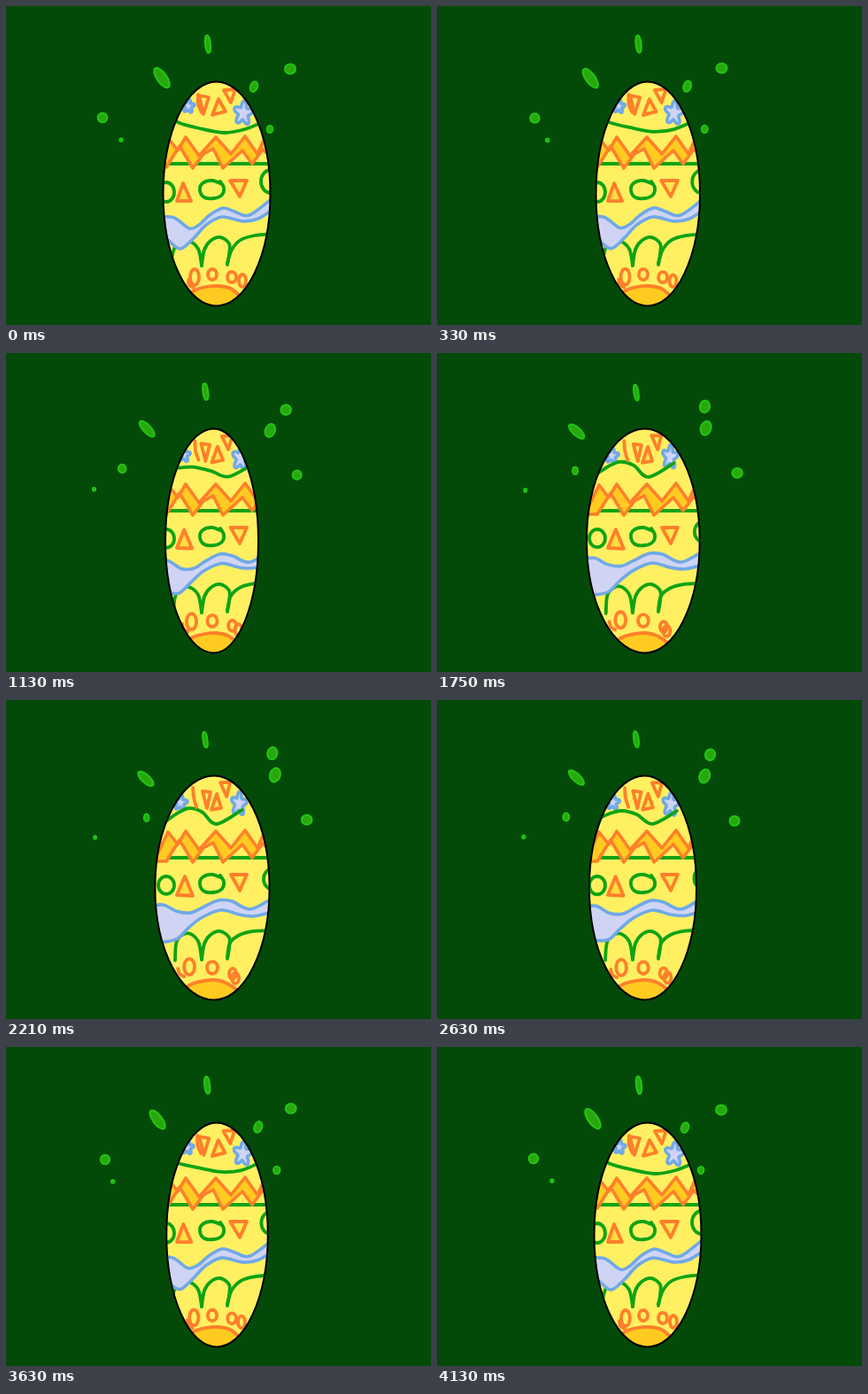
Recreate the animation shown at these times as an HTML page. Size 480 by 360 pixels, loop 4180 ms.

```html
<!DOCTYPE html>
<html lang="en">
<head>
<meta charset="utf-8">
<title>Easter egg</title>
<style>
  html, body { margin: 0; width: 100%; height: 100%; overflow: hidden; background: #034a08; }
  svg { display: block; width: 100%; height: 100%; }
  path, ellipse { stroke-linecap: round; stroke-linejoin: round; }
</style>
</head>
<body>
<svg id="stage" viewBox="0 0 480 360">
  <defs><clipPath id="shell"><path id="shellClip"/></clipPath></defs>
  <rect width="480" height="360" fill="#034a08"/>
  <g id="sparks"></g>
  <path id="base" fill="#fff062"/>
  <g id="decor" clip-path="url(#shell)"></g>
  <path id="outline" fill="none" stroke="#000" stroke-width="2"/>
</svg>
<script>
const LOOP = 4180, FRAME = 41.75, SWING = 98;
const ORANGE = '#ff7f2a', AMBER = '#ffcb20', GREEN = '#0fa313', BLUE = '#70a9e6', LILAC = '#d0d4f4';
const $ = id => document.getElementById(id);

function add(parent, tag, attrs) {
  const el = document.createElementNS('http://www.w3.org/2000/svg', tag);
  set(el, attrs);
  return parent.appendChild(el);
}
function set(el, attrs) {
  for (const key in attrs) el.setAttribute(key, attrs[key]);
}

const mix = (a, b, k) => a + (b - a) * k;
// Parabola through a, m and b at k = 0, 0.5 and 1.
const bend = ([a, m, b], k) => a + k * (4 * m - 3 * a - b) + k * k * 2 * (a - 2 * m + b);
// Piecewise linear track of [position, value] pairs.
function track(keys, k) {
  let i = 1;
  while (i < keys.length - 1 && k > keys[i][0]) i++;
  const [k0, v0] = keys[i - 1], [k1, v1] = keys[i];
  return mix(v0, v1, (k - k0) / (k1 - k0));
}

const points = text => text.split(' ').map(p => p.split(',').map(Number));
const morph = (a, b, k) => a.map((p, i) => p.map((v, j) => mix(v, b[i][j], k)));
const straight = pts => 'M' + pts.join('L');
// Catmull-Rom spline as cubic segments.
function smooth(pts) {
  let d = 'M' + pts[0];
  for (let i = 0; i < pts.length - 1; i++) {
    const a = pts[i - 1] || pts[i], b = pts[i], c = pts[i + 1], e = pts[i + 2] || c;
    d += 'C' + [b[0] + (c[0] - a[0]) / 6, b[1] + (c[1] - a[1]) / 6,
                c[0] - (e[0] - b[0]) / 6, c[1] - (e[1] - b[1]) / 6, c[0], c[1]].map(v => v.toFixed(2));
  }
  return d;
}

const updates = [];
function shape(stroke, fill, from, to = from, draw = smooth, close = '') {
  const a = points(from), b = points(to);
  const el = add($('decor'), 'path', { stroke, fill, 'stroke-width': 3.8 });
  updates.push(k => set(el, { d: draw(morph(a, b, k)) + close }));
}
const line = (stroke, from, to) => shape(stroke, 'none', from, to);
const triangle = (fill, from, to) => shape(ORANGE, fill, from, to, straight, 'Z');

function ring(stroke, fill, from, to = from) {
  const el = add($('decor'), 'ellipse', { stroke, fill, 'stroke-width': 3.8 });
  updates.push(k => {
    const [cx, cy, rx, ry] = from.map((v, i) => mix(v, to[i], k));
    set(el, { cx, cy, rx, ry });
  });
}

// A filled ribbon with both edges stroked.
function ribbon(stroke, fill, top0, low0, top1, low1, draw) {
  const tops = [top0, top1].map(points), lows = [low0, low1].map(points);
  const area = add($('decor'), 'path', { fill });
  const edges = add($('decor'), 'path', { stroke, fill: 'none', 'stroke-width': 3.6 });
  updates.push(k => {
    const top = draw(morph(...tops, k)), low = morph(...lows, k);
    set(edges, { d: top + draw(low) });
    set(area, { d: top + draw(low.reverse()).replace('M', 'L') + 'Z' });
  });
}

function flower(from, to) {
  const el = add($('decor'), 'path', { stroke: BLUE, fill: LILAC, 'stroke-width': 3.6 });
  updates.push(k => {
    const [x, y, w, h] = from.map((v, i) => mix(v, to[i], k));
    const pts = [];
    for (let i = 0; i <= 40; i++) {
      const a = i / 40 * 2 * Math.PI, r = 0.76 + 0.24 * Math.cos(5 * a + 1);
      pts.push([x + w * r * Math.cos(a), y + h * r * Math.sin(a)]);
    }
    set(el, { d: smooth(pts) });
  });
}

flower([206, 113, 7, 8], [197, 116, 8, 9]);
flower([268, 121, 11, 14], [263, 117, 9, 14]);
line(GREEN, '184,125 196,132 218,138 246,143 270,139 292,130', '182,136 193,128 206,122 221,126 237,140 266,124');
line(ORANGE, '217,100 217,111 221,120', '211,99 212,110 215,121');
triangle('none', '218,101 229,103 223,122', '222,103 231,104 227,122');
triangle('#ffe650', '240,105 233,123 248,119', '238,106 232,124 243,122');
triangle('none', '246,95 259,94 254,109', '242,93 253,93 249,109');

line(GREEN, '160,178 310,178');
const zigTop = '169,178 183,149 194,163 203,148 218,169 237,148 254,167 270,147 284,167 293,147 304,166';
const zigLow = '169,182 181,182 196,158 211,183 223,167 234,161 245,183 267,163 278,178 290,162 304,174';
ribbon(ORANGE, AMBER, zigTop, zigLow, zigTop, zigLow, straight);

ring(GREEN, 'none', [181, 210, 9, 11], [181, 209, 9, 10]);
line(GREEN, '244,201 233,197 222,200 219,208 224,216 235,217 244,213 246,205 242,198');
ring(GREEN, 'none', [299, 198, 11, 13], [302, 202, 11, 12]);
triangle('#ffdc40', '200,200 193,220 209,220', '202,199 193,220 211,221');
triangle('#ffe650', '253,197 272,197 264,215', '254,197 272,197 264,215');

line(GREEN, '186,292 191,272 205,265 217,274 221,293', '191,294 193,272 205,263 217,272 221,293');
line(GREEN, '221,293 224,275 231,265 242,261 252,268 252,280 250,292');
line(GREEN, '250,290 255,275 265,264 281,259 302,257', '250,290 253,274 264,265 280,261 302,260');
ribbon(BLUE, LILAC,
  '172,238 190,239 207,251 218,247 230,236 245,228 258,232 275,236 302,216',
  '172,255 184,265 197,274 212,262 226,247 244,238 268,243 285,240 302,229',
  '166,232 178,231 192,238 208,240 222,234 240,226 255,227 276,236 302,223',
  '166,272 180,273 194,269 206,257 222,245 243,237 263,242 280,244 302,239', smooth);

ring(ORANGE, 'none', [213, 306, 5, 9], [207, 301, 6, 9]);
ring(ORANGE, 'none', [233, 303, 5, 6], [233, 302, 6, 7]);
ring(ORANGE, 'none', [255, 306, 5, 6], [256, 309, 4, 6]);
ring(ORANGE, 'none', [267, 310, 4, 7], [259, 314, 4, 6]);
line(ORANGE, '206,309 207,315 212,318', '194,303 196,309 201,312');
shape(ORANGE, AMBER, '203,329 213,321 226,317 240,316 254,319 266,329',
  '200,326 211,320 223,317 236,316 248,319 262,328', smooth, 'L270,345L200,345Z');

// Sparks: x, y, rx, ry and tilt, each at the start, middle and end of the swing.
const sparks = [
  [[176, 160.5, 158], [81, 85, 89], [5.5, 4.5, 4.5], [13, 11.5, 11], [-35, -42, -48]],
  [[228, 225.5, 225], [43, 43.5, 45], [3, 3, 2.5], [10, 9.5, 9], [-6, -7, -9]],
  [[280, 296.5, 304], [91, 88, 84.5], [4, 5.3, 5.8], [6, 7.5, 8], [20, 22, 18]],
  [[321, 318, 300], [71, 65, 60], [6, 5.8, 5.5], [5.5, 5.5, 7], [0, 0, 15]],
  [[298, 325.5, 340], [139, 138, 135], [3.3, 4.8, 5.8], [4, 5, 5.5], [0, 0, 0]],
  [[109, 127, 160], [126, 130, 133], [5.3, 4.5, 2.8], [5.3, 4.8, 4.3], [0, 0, 0]],
  [[130, 101.5, 101], [151, 153.5, 155], [1.7, 1.7, 1.5], [1.8, 1.8, 1.8], [0, 0, 0]],
];
for (const spark of sparks) {
  const el = add($('sparks'), 'ellipse', { fill: '#2aa70e', stroke: '#1fc713', 'stroke-width': 2 });
  updates.push(k => {
    const [cx, cy, rx, ry, tilt] = spark.map(v => bend(v, k));
    set(el, { cx, cy, rx, ry, transform: `rotate(${tilt} ${cx} ${cy})` });
  });
}

const leftEdge = [[0, 177.5], [0.24, 185], [0.45, 183], [0.58, 180], [0.81, 172], [1, 168]];
const rightEdge = [[0, 298.5], [0.24, 293], [0.45, 284], [0.58, 285], [0.81, 293], [1, 298]];
updates.push(k => {
  const left = track(leftEdge, k), right = track(rightEdge, k);
  const tip = (237 + (left + right) / 2) / 2;
  const d = `M${tip},85.5A${tip - left},126.5 0 0 0 ${tip},338.5A${right - tip},126.5 0 0 0 ${tip},85.5Z`;
  for (const id of ['shellClip', 'base', 'outline']) set($(id), { d });
});

function render(now) {
  const n = Math.min(99, Math.floor((now % LOOP + 8) / FRAME));
  const swing = (1 - Math.cos(2 * Math.PI * n / SWING)) / 2;
  for (const update of updates) update(swing);
}

let start;
function tick(now) {
  start ??= now;
  render(now - start);
  requestAnimationFrame(tick);
}
render(0);
requestAnimationFrame(tick);
</script>
</body>
</html>
```
